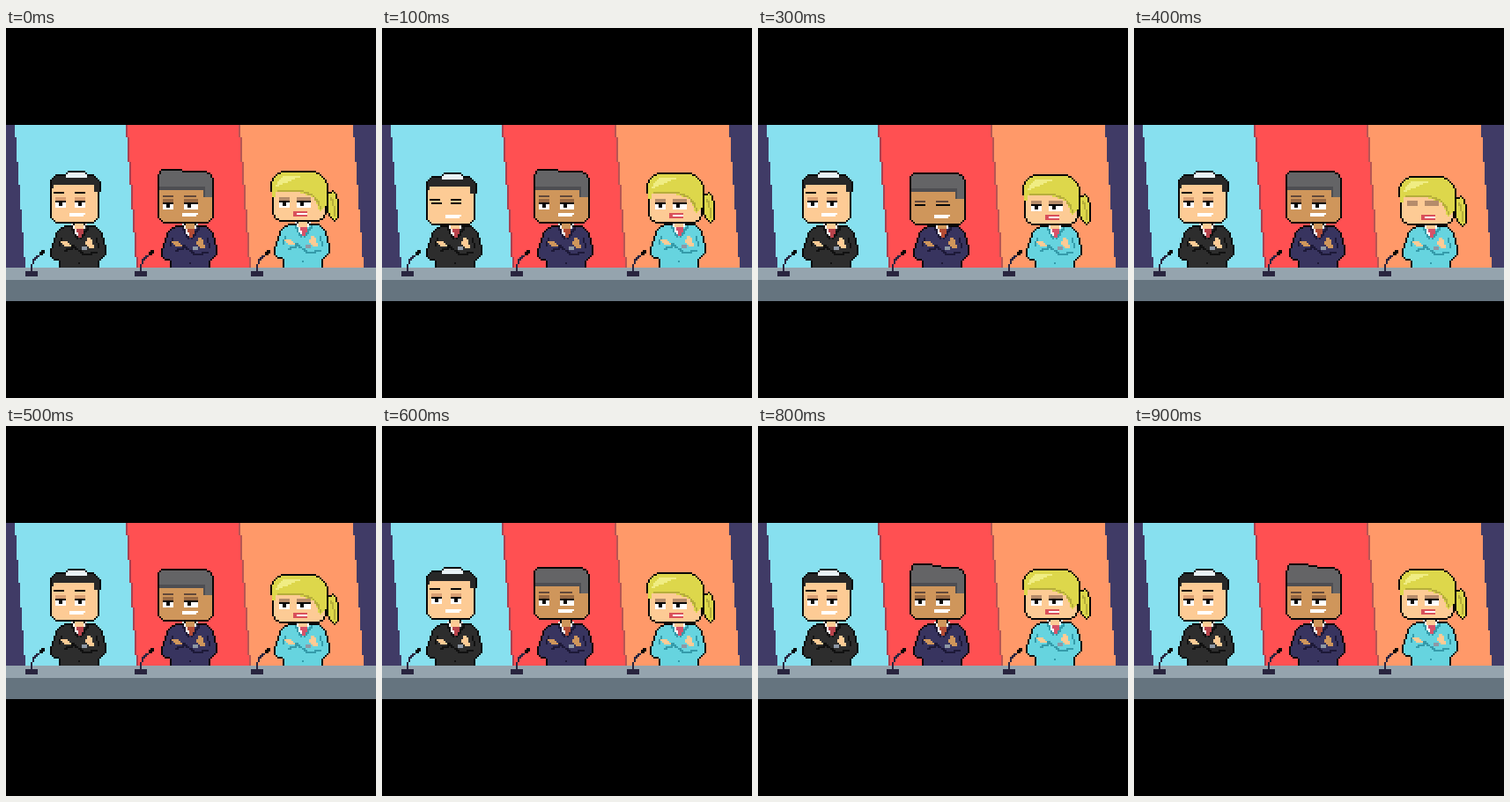
An HTML page with a canvas that plays this animation: 420 px wide and 420 px high, repeating every 1000 ms.

```html
<!DOCTYPE html>
<html lang="en">
<head>
<meta charset="utf-8">
<title>Panel</title>
<style>
  html, body { margin: 0; width: 100%; height: 100%; overflow: hidden; background: #000; }
  canvas { display: block; width: 420px; height: 420px; }
</style>
</head>
<body>
<canvas id="stage" width="420" height="420"></canvas>
<script>
const ctx = document.getElementById('stage').getContext('2d');
const INK = '#080808', WHITE = '#fff';

// Shapes are lists of one-row spans: [x, y, width].

function box(x, y, w, h = 1) {
  return Array.from({ length: h }, (_, i) => [x, y + i, w]);
}

function rounded(x, y, w, h, [tl, tr, br, bl]) {
  const inset = (r, i) => i < r ? r - Math.round(Math.sqrt(r * r - (r - i - 0.5) ** 2)) : 0;
  return box(x, y, w, h).map(([, row], i) => {
    const up = h - 1 - i;
    const left = inset(tl, i) + inset(bl, up);
    const right = inset(tr, i) + inset(br, up);
    return [x + left, row, w - left - right];
  });
}

function poly(points) {
  const ys = points.map(p => p[1]), spans = [];
  for (let y = Math.min(...ys); y < Math.max(...ys); y++) {
    const hits = [];
    points.forEach(([ax, ay], i) => {
      const [bx, by] = points[(i + 1) % points.length], mid = y + 0.5;
      if ((ay <= mid) !== (by <= mid)) hits.push(ax + (mid - ay) / (by - ay) * (bx - ax));
    });
    const left = Math.round(Math.min(...hits)), right = Math.round(Math.max(...hits));
    spans.push([left, y, Math.max(1, right - left)]);
  }
  return spans;
}

function curve(x0, y0, cx, cy, x1, y1) {
  return Array.from({ length: 25 }, (_, i) => {
    const t = i / 24, u = 1 - t;
    const mix = (a, b, c) => Math.round(u * u * a + 2 * u * t * b + t * t * c);
    return [mix(x0, cx, x1), mix(y0, cy, y1), 1];
  });
}

const line = (x0, y0, x1, y1) => curve(x0, y0, (x0 + x1) / 2, (y0 + y1) / 2, x1, y1);

function fill(color, ...shapes) {
  ctx.fillStyle = color;
  for (const [x, y, w] of shapes.flat()) ctx.fillRect(x, y, w, 1);
}

function at(dx, dy, draw) {
  ctx.save();
  ctx.translate(dx, dy);
  draw();
  ctx.restore();
}

function outline(...shapes) {
  for (const d of [-1, 1]) {
    at(d, 0, () => fill(INK, ...shapes));
    at(0, d, () => fill(INK, ...shapes));
  }
}

function outlined(color, ...shapes) {
  outline(...shapes);
  fill(color, ...shapes);
}

const people = {
  left:  { suit: '#2d2d2d', fold: '#111', skin: '#fdcb95', shade: '#d89f73', tie: '#b8434b' },
  mid:   { suit: '#38345f', fold: '#1d1938', skin: '#cf965b', shade: '#976843', tie: '#b34c35' },
  right: { suit: '#66d4df', fold: '#359baa', skin: '#fdcb95', shade: '#b58c6b', tie: '#d75269' }
};

function drawWall() {
  const panels = [[0, '#403b66'], [5, '#87e0ef'], [68, '#ff5052', '#a94050'],
                  [132, '#ff9969', '#b75553'], [197, '#403b66']];
  for (let y = 55; y < 136; y++) {
    const lean = Math.round((y - 55) / 13.5);
    for (const [x, color, edge] of panels) {
      const start = x && x + lean;
      fill(color, box(start, y, 210 - start));
      if (edge) fill(edge, box(start, y, 1));
    }
  }
}

function drawMic() {
  fill('#29253f', rounded(11, 138, 7, 3, [1, 1, 1, 1]), curve(14, 137, 14, 131, 19, 128));
  fill(INK, box(19, 127, 2, 2), box(20, 126, 2, 2));
}

function drawDesk() {
  fill('#95a4ae', box(0, 136, 210, 7));
  fill('#65747f', box(0, 143, 210, 12));
  for (const x of [0, 62, 128]) at(x, 0, drawMic);
}

function drawBody({ suit, fold, skin, tie }) {
  outlined(suit, poly([
    [9, 113], [25, 113], [29, 117], [31, 125], [31, 129], [27, 132],
    [27, 140], [6, 140], [6, 132], [1, 130], [1, 126], [5, 115]
  ]));
  fill(fold, line(12, 113, 15, 119), line(21, 113, 17, 119), line(6, 119, 5, 123),
    line(12, 123, 19, 128), line(19, 128, 26, 127), line(8, 126, 13, 124),
    line(26, 119, 27, 124), box(16, 133, 1));
  fill(WHITE, poly([[12, 111], [21, 111], [17, 118], [15, 118]]));
  fill(tie, poly([[15, 114], [19, 114], [18, 119], [16, 119]]));
  fill(skin, poly([[6, 121], [9, 121], [12, 124], [8, 124]]),
    poly([[21, 119], [23, 119], [25, 125], [22, 125], [20, 122]]));
  fill('#8e98a5', box(18, 124, 3, 2));
}

function drawNeck({ skin }) {
  outlined(skin, box(14, 106, 5, 6));
  fill(skin, box(14, 112, 5, 2));
}

function drawEye(x, y, w, closed, shade) {
  fill(shade, box(x, y - 3, w, 2));
  fill(INK, box(x, y - 1, w));
  if (closed) return;
  fill(WHITE, box(x, y, w, 3));
  fill(INK, box(x + 2, y, 2, 2));
}

function drawLeftHead(person, closed) {
  const head = rounded(26, 84, 26, 26, [4, 4, 4, 4]), sideburn = box(50, 87, 3, 6);
  const cap = rounded(34, 82, 12, 3, [2, 2, 0, 0]);
  outline(head, sideburn, cap);
  fill(person.skin, head);
  fill('#282828', head.slice(0, 5), sideburn, box(26, 89, 1, 2));
  fill('#e9f2f6', cap);
  const lid = closed ? person.skin : person.shade;
  drawEye(28, 99, 6, closed, lid);
  drawEye(39, 99, 6, closed, lid);
  const brow = closed ? 96 : 93;
  fill(INK, line(27, brow, 32, brow), line(39, brow, 44, brow));
  fill(WHITE, poly([[36, 105], [45, 105], [44, 107], [36, 107]]));
}

function drawMidHead(person, closed, lift) {
  const head = rounded(87, 82, 30, 28, [2, 5, 4, 4]);
  const quiff = lift ? poly([[88, 83], [88, 82 - lift], [96, 82 - lift], [112, 83]]) : [];
  outline(head, quiff);
  fill(person.skin, head);
  fill('#646466', head.slice(0, 9), quiff, box(112, 91, 5, 5));
  fill('#4e4e52', box(87, 90, 26, 2), line(112, 91, 112, 95));
  const lid = closed ? person.skin : person.shade;
  drawEye(89, 100, 6, closed, lid);
  drawEye(101, 100, 8, closed, lid);
  const brow = closed ? 97 : 95;
  fill('#62483a', line(89, brow, 94, brow), line(101, brow, 107, brow));
  fill(WHITE, poly([[100, 105], [109, 105], [108, 107], [100, 107]]));
}

function drawTail() {
  outlined('#ddd74b', poly([
    [183, 94], [186, 93], [188, 98], [188, 106], [187, 109], [185, 108], [183, 104]
  ]));
  fill('#b6ae3b', curve(184, 96, 186, 100, 186, 106));
}

function drawRightHead(person, closed, hairDy, faceDy) {
  const face = rounded(152, 88, 29, 21, [0, 0, 5, 5]);
  const hair = rounded(151, 82, 31, 11, [8, 9, 0, 0]);
  const sweep = poly([[162, 92], [182, 92], [182, 101], [178, 104], [175, 96]]);
  at(0, faceDy, () => outline(face));
  at(0, hairDy, () => outline(hair, sweep));
  at(0, faceDy, () => {
    fill(person.skin, face);
    drawEye(155, 99, 6, closed, person.shade);
    drawEye(165, 99, 8, closed, person.shade);
    if (closed) fill(person.shade, box(155, 98, 6), box(165, 98, 8));
    fill('#d9505b', box(163, 104, 8, 3));
    fill(WHITE, box(165, 105, 6));
  });
  at(0, hairDy, () => {
    fill('#ddd74b', hair, sweep, box(151, 93, 2, 3));
    fill('#f0ed83', poly([[154, 87], [158, 84], [168, 84], [156, 89], [153, 90]]));
    fill('#b6ae3b', line(154, 92, 168, 92), curve(169, 93, 176, 94, 178, 102));
  });
}

const LOOP = 10; // ticks of 100 ms
const swing = (tick, peak) => Math.cos(2 * Math.PI * (tick - peak) / LOOP);

function render() {
  const tick = Math.floor(performance.now() / 100) % LOOP;
  const nod = Math.round(0.55 * swing(tick, 1));
  const sway = Math.round(0.75 * swing(tick, 2.4) - 0.1);
  const flick = Math.max(0, Math.round(3 - 0.55 * ((tick + 3) % LOOP)));
  const dip = 1.35 * (1 + swing(tick, 4.3));
  const hairDy = Math.round(dip), chestDy = Math.round(dip / 3) - 1;
  const { left, mid, right } = people;

  ctx.setTransform(2, 0, 0, 2, 0, 0); // one art pixel is two stage pixels
  fill('#000', box(0, 0, 210, 210));
  drawWall();
  for (const [person, x, dy] of [[left, 25, 0], [mid, 88, 0], [right, 152, chestDy]]) {
    at(x, dy, () => drawBody(person));
    at(x, dy, () => drawNeck(person));
  }
  at(0, nod, () => drawLeftHead(left, tick === 1));
  at(0, sway, () => drawMidHead(mid, tick === 3, flick));
  at(0, hairDy, drawTail);
  drawRightHead(right, tick === 4, hairDy, Math.round(dip * 0.75));
  drawDesk();
  requestAnimationFrame(render);
}
render();
</script>
</body>
</html>
```
